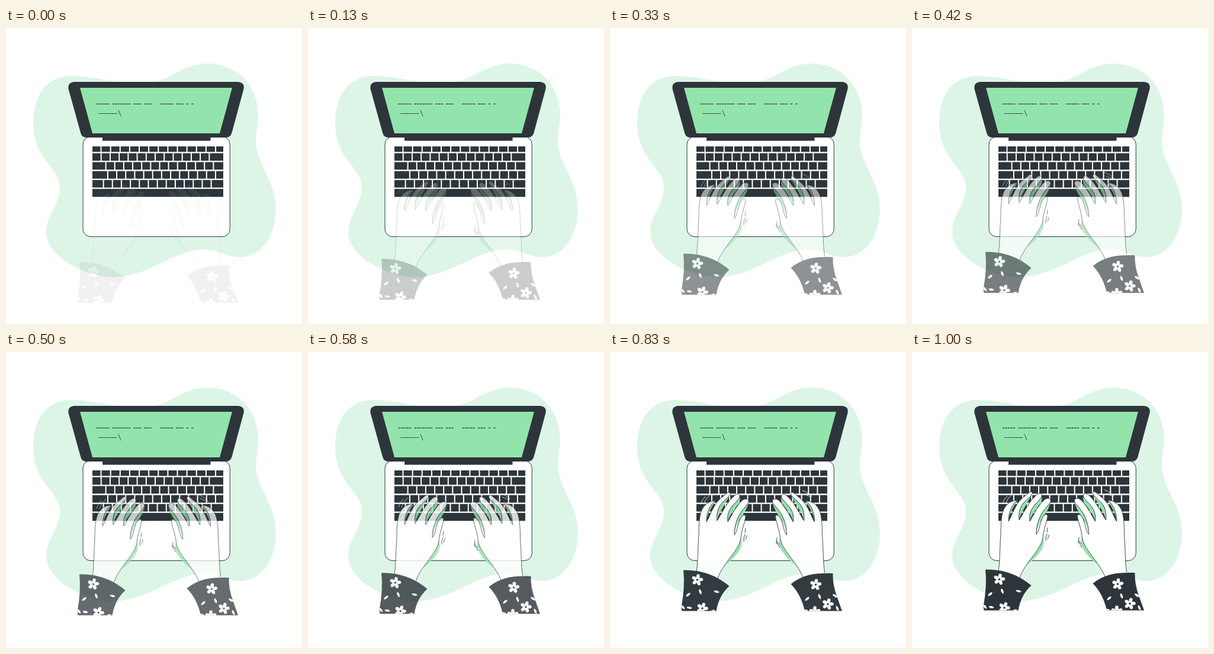
Write an HTML page that moves like this. It is 500 px wide and 500 px high and loops after 1.04 s.

```html
<!DOCTYPE html>
<html lang="en">
<head>
<meta charset="utf-8">
<title>Typing hands</title>
<style>
html, body { margin: 0; width: 100%; height: 100%; overflow: hidden; background: #fff; }
svg { display: block; width: 100vw; height: 100vh; }
.dark { fill: #2d353a; }
.mint { fill: #93e4ac; }
.ink { fill: none; stroke: #2d353a; stroke-width: .9; stroke-linecap: round; }
.glint { fill: none; stroke: #fff; stroke-width: .8; stroke-linecap: round; }
.code { fill: none; stroke: #2d353a; stroke-width: 1.2; stroke-dasharray: 3.7 .8; }
.petals { fill: #fff; }
</style>
</head>
<body>
<svg viewBox="0 0 500 500">
  <defs>
    <path id="cuffL" d="M124 367.5C140 367 172 369 201.500 394.500Q184 410 179.500 436.500H121.500L120.500 430Q127 395 124 367.500Z"/>
    <path id="cuffR" d="M305.500 391C326 374 350 372 376.500 373Q376 392 383 411L392 436.500H329Q323 409 305.500 391Z"/>
    <clipPath id="clipL"><use href="#cuffL"/></clipPath>
    <clipPath id="clipR"><use href="#cuffR"/></clipPath>
    <g id="hand">
      <path class="mint" d="M221 312C227 326 217 340 200 355L193 360C205 343 220 328 221 312Z"/>
      <!-- shaded side of each finger -->
      <path class="mint" d="M178 251C170 256 163 268 163 286C164 276 167 268 178 251Z
        M203 240C199 246 190 252 186 258C181 266 180 275 181 284C183 273 191 262 203 240Z
        M219 244C216 251 208 256 204 263C199 270 198 278 199 286C201 276 208 268 216 257Q221 250 219 244Z
        M234 253C231 259 223 265 218 275C213 285 210 295 210 308C212 296 216 286 222 278Q232 264 234 253Z"/>
      <path fill="#fff" stroke="#2d353a" stroke-width=".9" stroke-linejoin="round" d="M146 372C149 350 148 330 150 308C150 290 151 272 156 264C161 255 170 250 178 251
        C170 256 163 268 163 286C167 280 170 270 176 260C181 250 190 244 196 239C199 235 204 235 203 240
        C199 246 190 252 186 258C181 266 180 275 181 284C186 276 190 268 197 257C202 250 206 245 211 241C216 237 220 239 219 244
        C216 251 208 256 204 263C199 270 198 278 199 286C203 280 206 272 214 261C218 255 222 250 226 248C231 246 235 248 234 253
        C231 259 223 265 218 275C213 285 210 295 210 308C215 302 215 294 219 283C222 275 229 271 229 278
        C227 290 222 300 221 314C219 328 205 343 194 359C188 368 184 374 182 382"/>
    </g>
    <path id="leaf" d="M-5 0Q0-4 5 0Q0 4-5 0Z"/>
    <ellipse id="petal" cy="-5.800" rx="2.900" ry="4"/>
    <g id="flower">
      <use href="#petal"/>
      <use href="#petal" transform="rotate(72)"/>
      <use href="#petal" transform="rotate(144)"/>
      <use href="#petal" transform="rotate(216)"/>
      <use href="#petal" transform="rotate(288)"/>
      <circle r="3.500"/>
      <circle r="1.700" class="dark"/>
    </g>
  </defs>

  <path fill="#ddf5e6" d="M46 160C46 110 72 80 112 81C150 82 170 90 215 95C279 97 290 60 342 60C385 61 425 90 426 148C426 165 422 175 422 192C424 235 456 255 456 308C455 350 432 387 396 387C372 387 358 374 335 374C285 374 240 421 180 421C130 419 68 385 68 345C68 315 92 298 91 267C89 234 46 222 46 160Z"/>

  <rect x="130" y="183.500" width="248.300" height="169" rx="13" fill="#fff" stroke="#2d353a"/>
  <path class="dark" d="M163 184H345.500V190.500H163Z"/>
  <path class="dark" d="M115 91H392Q403.500 92 401.500 103L381.500 177Q379 185 371 185H136Q128 185 126 177L105.500 103Q104 92 115 91Z"/>
  <path class="mint" d="M125 101H382L361 178H146Z"/>
  <g id="code" class="code"></g>
  <path class="ink" d="M190 139L194 149"/>
  <path id="keys" class="dark"/>

  <g id="hands">
    <use href="#hand"/>
    <use href="#hand" transform="matrix(-1 0 0 1 508.500 0)"/>
    <path class="ink" d="M229 297L228 304M228 307Q225 313 226 319M231.500 309L229 316M282 313Q280 320 287 330M281 318V323M284 321L287 325"/>
    <path class="glint" d="M153 256Q155 249 161 243M158 256Q161 248 168 241M325 233Q334 236 341 243M328 239L337 243"/>
    <use href="#cuffL" class="dark"/>
    <use href="#cuffR" class="dark"/>
    <g id="printL" class="petals" clip-path="url(#clipL)"></g>
    <g id="printR" class="petals" clip-path="url(#clipR)"></g>
  </g>
</svg>
<script>
const $ = id => document.getElementById(id);

// Text on the screen: x, y, number of dashes
$('code').innerHTML = [
  [152.5, 128.3, 5], [179.5, 128.3, 7], [215.5, 128.3, 3], [233, 128.3, 3],
  [260.5, 128.3, 5], [287, 128.3, 3], [304.5, 128.3, 1], [313, 128.3, 1], [156.5, 144.5, 7]
].map(([x, y, n]) => `<path d="M${x} ${y}h${n * 4.5 - .8}"/>`).join('');

// Keyboard rows: top, height, right edge of the first key, pitch, middle keys
const key = (x, y, right, h) => `M${x} ${y}H${right}v${h}H${x}Z`;
$('keys').setAttribute('d', [
  [200, 9.3, 159.5, 16.13, 12], [211.5, 12.8, 159.7, 15.22, 12], [226.5, 12.8, 167.6, 15.15, 12],
  [241.7, 12.8, 170.9, 15.17, 12], [256.8, 12.8, 163.6, 15.17, 12]
].map(([y, h, first, pitch, n]) => {
  const gap = 2;
  let row = key(146, y, first, h), x = first + gap;
  for (let i = 0; i < n; i++, x += pitch) row += key(x, y, x + pitch - gap, h);
  return row + key(x, y, 367, h);
}).join('') + key(146, 271.8, 367, 13.4));

// Sleeve prints: shape, x, y, angle
const print = (id, items) => $(id).innerHTML = items.map(([shape, x, y, a]) =>
  `<use href="#${shape}" transform="translate(${x} ${y}) rotate(${a})"/>`).join('');
print('printL', [
  ['flower', 147.5, 384, 12], ['flower', 156, 432, 20], ['leaf', 132, 409, -40], ['leaf', 152.5, 404, 70],
  ['leaf', 180, 404, 12], ['leaf', 134, 431, 8], ['leaf', 123, 430, 50], ['leaf', 173, 437, -25]
]);
print('printR', [
  ['flower', 347.5, 392, 8], ['flower', 368, 425, 15], ['flower', 346, 438, 0],
  ['leaf', 333, 416, -40], ['leaf', 354, 412, 70], ['leaf', 380, 411, 35],
  ['leaf', 384, 432, 65], ['leaf', 331, 436, 15]
]);

const LOOP = 1040, STEPS = 25, RISE = 30;
const start = performance.now();

function draw(now) {
  const t = Math.max(0, now - start) % LOOP;
  const step = Math.floor((Math.floor(t / 10) * 10 + 5) / (LOOP / STEPS));
  const shown = Math.sin((step + 1) / STEPS * Math.PI / 2);
  $('hands').setAttribute('opacity', shown);
  $('hands').setAttribute('transform', `translate(0 ${RISE * (1 - shown)})`);
  requestAnimationFrame(draw);
}
draw(start);
</script>
</body>
</html>
```
